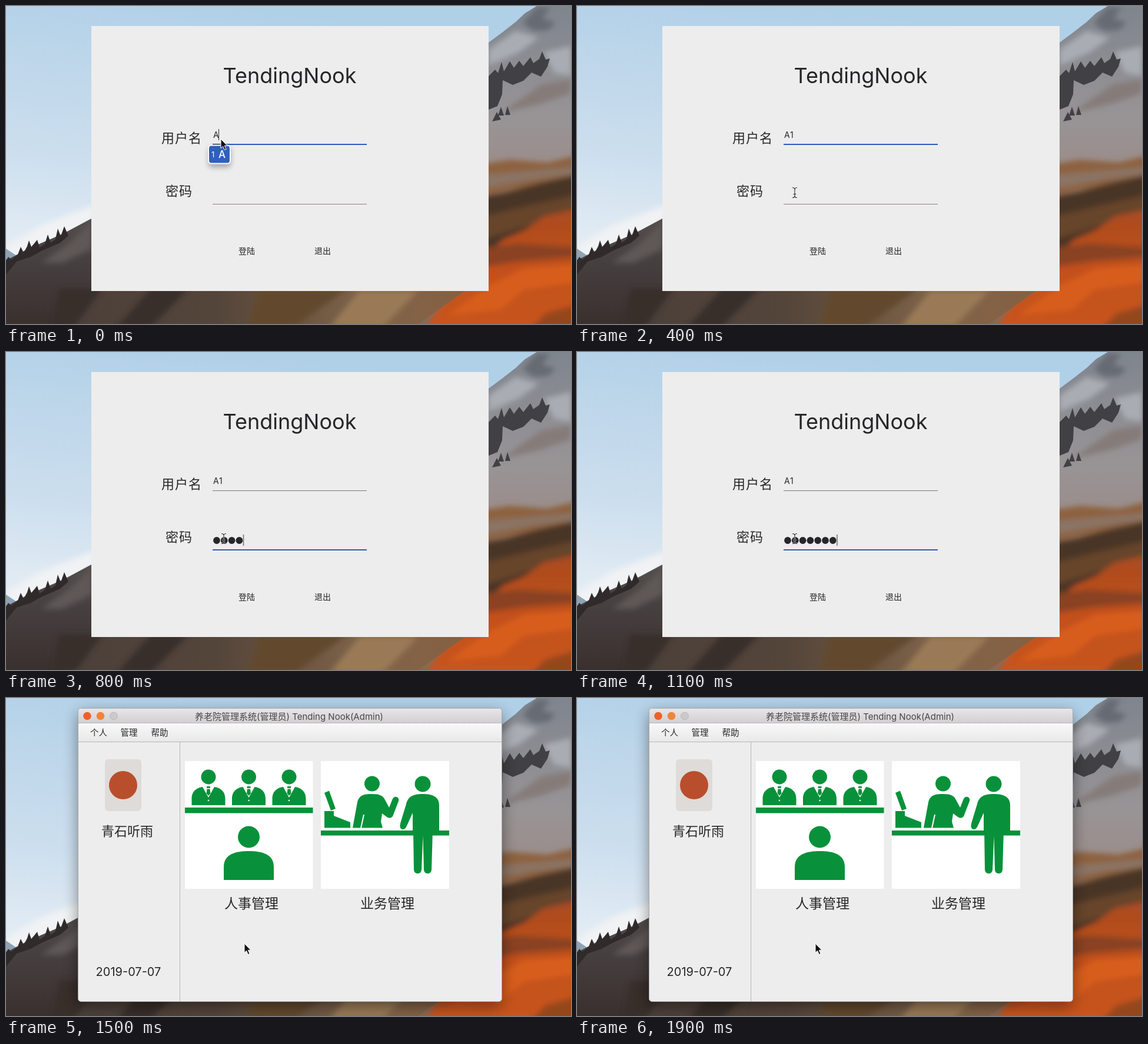
Animation of 960x540 px, one loop 2 s. Source, as an HTML page:

```html
<!DOCTYPE html>
<html lang="zh-CN">
<head>
<meta charset="utf-8">
<title>Login</title>
<style>
html, body { margin: 0; width: 100%; height: 100%; overflow: hidden; background: #b5d3ea; }
svg { display: block; width: 100vw; height: 100vh; }
text { font-family: Inter, "Noto Sans CJK SC", "Noto Sans CJK", sans-serif; fill: #262528; }
.mid { text-anchor: middle; }
.label { font-size: 22px; letter-spacing: 1px; font-weight: 500; }
.small { font-size: 14px; }
.focus { stroke: #2d5cbd; stroke-width: 2; }
.green { fill: #08913a; }

/* One loop is 2 s, so 5% is one 100 ms step. */
.anim { animation: 2s step-end infinite; }
.login { animation-name: login; }
.main { animation-name: main; }
.compose { animation-name: compose; }
.digit { animation-name: digit; }
.user-focus { animation-name: user-focus; }
.pass-focus { animation-name: pass-focus; }
.typing { animation-name: typing; }
.caret { animation-name: caret; }
.pointer { animation-name: pointer; }
.arrow { animation-name: arrow; }
.ibeam { animation-name: ibeam; }

@keyframes login { 0% { opacity: 1 } 75%, 100% { opacity: 0 } }
@keyframes main { 0% { opacity: 0 } 75%, 100% { opacity: 1 } }
@keyframes compose { 0% { opacity: 1 } 5%, 100% { opacity: 0 } }
@keyframes digit { 0% { opacity: 0 } 10%, 100% { opacity: 1 } }
@keyframes user-focus { 0% { opacity: 1 } 25%, 100% { opacity: 0 } }
@keyframes pass-focus { 0% { opacity: 0 } 25%, 100% { opacity: 1 } }
@keyframes caret { 0% { opacity: 0 } 35% { opacity: 1 } 60%, 100% { opacity: 0 } }
@keyframes typing {
  0% { transform: none }
  30% { transform: translateX(12.8px) }
  35% { transform: translateX(25.6px) }
  40% { transform: translateX(51.2px) }
  45% { transform: translateX(64px) }
  50%, 100% { transform: translateX(89.6px) }
}
@keyframes pointer {
  0% { transform: translate(365px, 226px) }
  15% { transform: translate(368px, 272px) }
  20% { transform: translate(370px, 317px) }
  65% { transform: translate(391px, 378px) }
  70%, 100% { transform: translate(405px, 417px) }
}
@keyframes arrow { 0% { opacity: 1 } 20% { opacity: 0 } 65%, 100% { opacity: 1 } }
@keyframes ibeam { 0% { opacity: 0 } 20% { opacity: 1 } 65%, 100% { opacity: 0 } }
</style>
</head>
<body>
<svg viewBox="0 0 960 540" preserveAspectRatio="none">
  <defs>
    <linearGradient id="sky" x1=".4" y1="0" x2=".2" y2="1">
      <stop offset="0" stop-color="#b0d0e8"/>
      <stop offset=".25" stop-color="#bfd7ea"/>
      <stop offset=".5" stop-color="#cbdeee"/>
      <stop offset=".75" stop-color="#e0eaf3"/>
      <stop offset="1" stop-color="#f1f4f6"/>
    </linearGradient>
    <linearGradient id="ridge" x1="0" y1="0" x2="0" y2="1">
      <stop offset="0" stop-color="#5b5655"/>
      <stop offset=".45" stop-color="#474141"/>
      <stop offset="1" stop-color="#3a302e"/>
    </linearGradient>
    <linearGradient id="peak" x1="0" y1="0" x2="0" y2="1">
      <stop offset="0" stop-color="#7f858e"/>
      <stop offset=".35" stop-color="#989496"/>
      <stop offset=".6" stop-color="#9c8983"/>
      <stop offset="1" stop-color="#84695a"/>
    </linearGradient>
    <linearGradient id="autumn" x1="0" y1="0" x2="0" y2="1">
      <stop offset="0" stop-color="#a84a20"/>
      <stop offset=".5" stop-color="#c2501d"/>
      <stop offset="1" stop-color="#c8541b"/>
    </linearGradient>
    <linearGradient id="slope">
      <stop offset="0" stop-color="#4b403a"/>
      <stop offset=".3" stop-color="#54453a"/>
      <stop offset=".6" stop-color="#80644a"/>
      <stop offset="1" stop-color="#8c5c38"/>
    </linearGradient>
    <linearGradient id="bar" x1="0" y1="0" x2="0" y2="1">
      <stop offset="0" stop-color="#e8e6e8"/>
      <stop offset="1" stop-color="#d1cfd1"/>
    </linearGradient>
    <linearGradient id="menu" x1="0" y1="0" x2="0" y2="1">
      <stop offset="0" stop-color="#f8f8f8"/>
      <stop offset="1" stop-color="#e9e9e9"/>
    </linearGradient>
    <filter id="soft" x="-20%" y="-20%" width="140%" height="150%"><feGaussianBlur stdDeviation="13"/></filter>
    <filter id="blur" x="-50%" y="-50%" width="200%" height="200%"><feGaussianBlur stdDeviation="5"/></filter>
    <path id="mountain" d="M780 100 820 62 843 45 866 27 882 12 902 0H960V540H700L780 484Z"/>
    <clipPath id="inside"><use href="#mountain"/></clipPath>
    <path id="beam" d="M-4-8.5Q0-8.5 0-5.5 0-8.5 4-8.5M0-6V6M-4 8.5Q0 8.5 0 5.5 0 8.5 4 8.5M-2.5 2.5H2.5"/>
    <g id="member">
      <circle cy="134" r="12.5"/>
      <path d="M-28.5 182V171C-28.5 157-18 152-10 151L0 169 10 151C18 152 28.5 157 28.5 171V182Z"/>
      <path d="M-3 150H3V153H-3ZM-2.5 154.5H2.5L3.5 162 0 166-3.5 162Z"/>
      <circle cy="174" r="1.3" fill="#fff"/>
    </g>
  </defs>

  <g id="wallpaper">
    <path fill="url(#sky)" d="M0 0H960V540H0Z"/>
    <path fill="#f0f2f4" filter="url(#blur)" d="M0 408 60 372 150 338V400L0 440Z"/>
    <path fill="#8fa3b6" d="M0 412 18 424V436H0Z"/>
    <path fill="url(#ridge)" d="M0 432 40 411 80 394 100 385 145 361 250 330V540H0Z"/>
    <path fill="#5f5956" filter="url(#blur)" d="M145 368 108 402 60 436 96 436 145 412Z"/>
    <path fill="#302a2b" d="M0 432 4 426 9 431 20 422 25 409 30 419 36 408 39 398 43 409 49 402 53 397 57 410 66 404 71 388 76 402 84 396 88 378 93 391 99 374 106 390 92 402 60 416 42 426 18 434 0 456Z"/>
    <path fill="url(#slope)" d="M140 484H960V540H100Z"/>
    <g filter="url(#blur)">
      <path fill="#382e2a" d="M90 480H164L116 545H80ZM246 480H310L246 545H188Z"/>
      <path fill="#62492f" d="M430 480H580L490 545H410Z"/>
      <path fill="#9a7a56" d="M600 484H700L640 545H550Z"/>
    </g>

    <use href="#mountain" fill="url(#peak)"/>
    <g clip-path="url(#inside)">
      <g filter="url(#blur)">
        <path fill="#666b73" d="M878 29 902 2 925 3 911 21 934 28 921 41 896 42Z"/>
        <path fill="#a9adb3" d="M820 74 866 42 905 54 871 79 820 101ZM914 79 960 68V118L931 113Z"/>
        <path fill="#857b79" d="M840 182 910 133 960 124V148L908 166Z"/>
        <path fill="#8d6240" d="M800 270 855 261 920 266 980 251V300L890 306 800 324Z"/>
        <path fill="#8b7565" d="M800 288 880 281 980 272V284L896 294 800 312Z"/>
        <path fill="#493427" d="M760 332 850 316 905 301 980 284V420L820 440 760 460Z"/>
        <path fill="#66442b" d="M800 360 896 337 980 318V345L870 378 800 400Z"/>
        <path fill="url(#autumn)" d="M980 342 914 357 881 381 846 396 820 418 790 470 745 498 710 550H980Z"/>
        <path fill="#8a4220" d="M800 412 870 403 980 410V425L880 433 800 445Z"/>
        <path fill="#d75d1b" d="M820 475 882 445 980 438V468L880 482 840 516 750 525Z"/>
        <path fill="#95471e" d="M890 550 916 522 980 504V550Z"/>
      </g>
      <path fill="#414044" d="M820 119 831 108 836 114 842 95 846 111 856 94 863 105 872 93 879 102 891 87 896 97 906 90 911 77 917 91 924 89 920 103 909 120 893 113 879 127 861 134 844 126 843 150 835 170 820 176ZM826 196 834 180 841 193ZM836 186 841 171 846 186ZM848 185 852 170 857 185Z"/>
    </g>
  </g>

  <g class="anim login">
    <path fill="#ededed" d="M145 34H820V484H145Z"/>
    <text class="mid" x="482" y="131" font-size="36">TendingNook</text>
    <text class="label" x="264" y="232">用户名</text>
    <text class="label" x="271" y="322">密码</text>
    <text class="small" x="395" y="421" font-weight="500">登陆</text>
    <text class="small" x="524" y="421" font-weight="500">退出</text>

    <path stroke="#77777a" d="M351 235.500H613"/>
    <path class="anim focus user-focus" d="M351 235H613"/>
    <text class="small" x="352" y="224">A</text>
    <text class="small anim digit" x="362" y="224">1</text>
    <g class="anim compose">
      <path stroke="#262528" d="M361.500 209V228M351 234.500H364"/>
      <rect x="344" y="240" width="38" height="34" rx="6" opacity=".3" filter="url(#blur)"/>
      <rect x="344" y="236.500" width="37" height="31" rx="5" fill="#2f60bd" stroke="#fff" stroke-width="2"/>
      <text x="349" y="257" font-size="13" style="fill:#fff">1</text>
      <text x="361" y="258" font-size="17" font-weight="500" style="fill:#fff">A</text>
    </g>

    <path stroke="#967b76" d="M351 336.500H613"/>
    <path class="anim focus pass-focus" d="M351 336H613"/>
    <path fill="none" stroke="#262528" stroke-width="11.800" stroke-linecap="round" stroke-dasharray="0 12.800" d="M358 320H435.500"/>
    <g class="anim typing">
      <path fill="#ededed" d="M351.600 313H460V328H351.600Z"/>
      <path class="anim caret" stroke="#262528" d="M352.300 310V329"/>
    </g>
  </g>

  <g class="anim main">
    <rect x="123" y="26" width="719" height="497" rx="6" opacity=".45" filter="url(#soft)"/>
    <rect x="122.500" y="17.500" width="720" height="498" rx="5" fill="#ededed" stroke="#aaa8a8"/>
    <path fill="url(#bar)" d="M123 42V23Q123 18 128 18H837Q842 18 842 23V42Z"/>
    <path fill="url(#menu)" d="M123 43H842V74H123Z"/>
    <path fill="none" stroke="#b8b6b8" d="M123 42.500H842M123 74.500H842M295.500 75V515"/>
    <circle cx="138" cy="30.500" r="6.800" fill="#ee6029"/>
    <circle cx="160.500" cy="30.500" r="6.800" fill="#f28438"/>
    <circle cx="183" cy="30.500" r="6.500" fill="#cbc9cb" stroke="#bab8ba"/>
    <text class="mid" x="481" y="36.500" font-size="15" style="fill:#474548">养老院管理系统(管理员) Tending Nook(Admin)</text>
    <g font-size="14.500" font-weight="500">
      <text x="143" y="64">个人</text>
      <text x="194.500" y="64">管理</text>
      <text x="246.500" y="64">帮助</text>
    </g>

    <rect x="168" y="104" width="62" height="88" rx="6" fill="#dedbd8"/>
    <circle cx="199" cy="148" r="24" fill="#b94e2c"/>
    <text class="mid" x="206" y="233.500" font-size="22" font-weight="500">青石听雨</text>
    <text class="mid" x="208" y="471.500" font-size="20">2019-07-07</text>

    <path fill="#fff" d="M304 107H521.500V324H304ZM535 107H753V324H535Z"/>
    <g class="green">
      <use href="#member" x="344"/>
      <use href="#member" x="412.500"/>
      <use href="#member" x="481"/>
      <path d="M304 186H521.500V195.500H304Z"/>
      <circle cx="412.500" cy="236" r="18.500"/>
      <path d="M370 309V287C370 265 390 260 412.500 260S455 265 455 287V309Z"/>

      <path d="M535 225H753V233.500H535Z"/>
      <path d="M541 161 549 157.500 560 188 552 191ZM541 192H557V200L585 211V220.500H541Z"/>
      <circle cx="622" cy="145.500" r="13"/>
      <path d="M589 220.500 597 177C600 165 608 163 622 163S641 166 645 175L651 186 657 171Q660 166 665 168.500 668 171 667 175L657 201Q653 206 647 202L639 196 637 210 640 220.500Z"/>
      <path fill="none" stroke="#fff" stroke-width="2" d="M603 221 608 198"/>
      <circle cx="708" cy="146" r="13.500"/>
      <path d="M708 163C691 163 683 168 680 180L670 213Q668 221 673 223 678 224 681 217L691 195V226H736V182C736 167 724 163 708 163Z"/>
      <path d="M692 225H725L723 292Q722 298 716.500 298T710 292L708.500 234 706 292Q705 298 699.500 298T693 292Z"/>
    </g>
    <g class="mid" font-size="23" font-weight="500">
      <text x="417" y="357">人事管理</text>
      <text x="648" y="357">业务管理</text>
    </g>
  </g>

  <g class="anim pointer">
    <path class="anim arrow" fill="#111" stroke="#fff" d="M0 0V15.500L3.600 12.200 6.300 18.500 9 17.300 6.300 11.200H11Z"/>
    <g class="anim ibeam" fill="none">
      <use href="#beam" stroke="#fff" stroke-width="2.600" opacity=".7"/>
      <use href="#beam" stroke="#222" stroke-width="1.100"/>
    </g>
  </g>
</svg>
</body>
</html>
```
